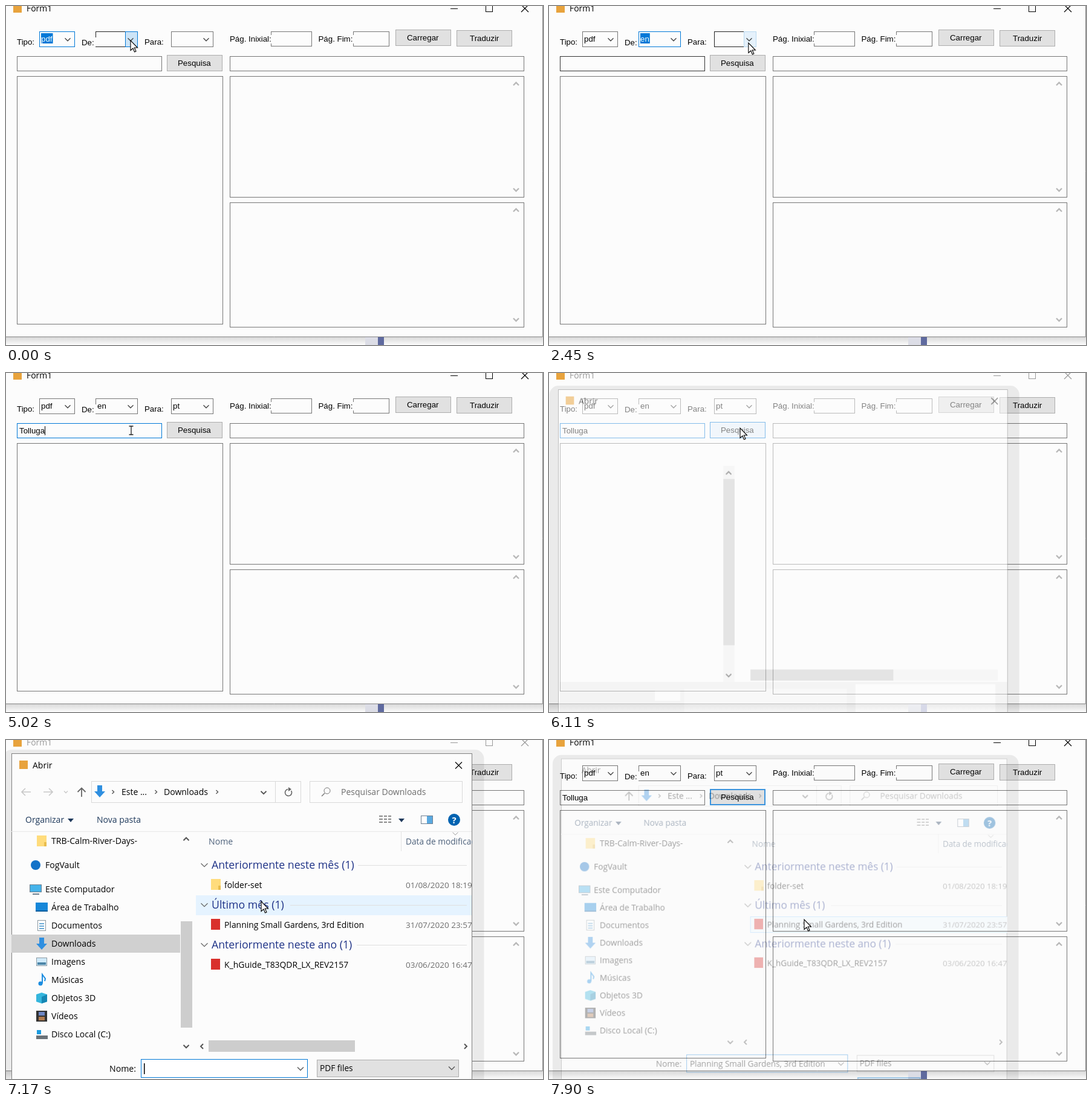
An HTML page with a canvas that plays this animation: 888 by 561 pixels, repeating every 8 s.

```html
<!DOCTYPE html>
<html lang="pt">
<head>
<meta charset="utf-8">
<title>Form1</title>
<style>
html, body { margin: 0; width: 888px; height: 561px; overflow: hidden; background: #fff; }
canvas { display: block; }
</style>
</head>
<body>
<canvas id="stage" width="888" height="561"></canvas>
<script>
const stage = document.getElementById('stage').getContext('2d');
const layer = document.createElement('canvas');
layer.width = 888;
layer.height = 600;
const dialogCtx = layer.getContext('2d');
let g = stage;

const LOOP = 8000, BLUE = '#0078d7', PAPER = '#fcfcfc', INK = '#000';
const FORM = '13.3px "Liberation Sans", Arial, sans-serif';
const ui = size => `${size}px "Open Sans", "Noto Sans", sans-serif`;
const WORD = 'Tolluga', BOOK = 'Planning Small Gardens, 3rd Edition';

// Bursts of screen updates: first, last, count
const bursts = [[0, 0, 1], [130, 740, 5], [1200, 1200, 1], [1630, 1750, 2], [2030, 2960, 8],
  [3080, 3510, 4], [3940, 4870, 8], [5020, 5720, 6], [6110, 7020, 7], [7170, 7620, 4], [7900, 7900, 1]];
const ticks = bursts.flatMap(([a, b, n]) =>
  Array.from({ length: n }, (_, i) => a + (n > 1 ? (b - a) * i / (n - 1) : 0)));

// Pointer path: time, x, y
const path = [[0, 206, 57], [130, 206, 57], [740, 184, 88], [1620, 184, 88], [1750, 187, 90],
  [2030, 187, 90], [2429, 330, 61], [2960, 330, 61], [3500, 313, 77], [3940, 313, 77],
  [4300, 207, 95], [5020, 207, 95], [5440, 316, 91], [6262, 316, 91], [7019, 422, 267],
  [7170, 422, 267], [7320, 422, 297], [LOOP, 422, 297]];

function pointer(t) {
  const i = path.findIndex(p => p[0] > t);
  const [t0, x0, y0] = path[i - 1], [t1, x1, y1] = path[i];
  const k = (t - t0) / (t1 - t0);
  return [x0 + (x1 - x0) * k, y0 + (y1 - y0) * k];
}

function fill(x, y, w, h, color) {
  g.fillStyle = color;
  g.fillRect(x, y, w, h);
}

function box(x, y, w, h, border, color = PAPER, line = 1) {
  fill(x, y, w, h, color);
  g.strokeStyle = border;
  g.lineWidth = line;
  g.strokeRect(x + line / 2, y + line / 2, w - line, h - line);
}

function text(s, x, y, color = INK, font = FORM) {
  g.font = font;
  g.fillStyle = color;
  g.fillText(s, x, y);
}

function lines(color, width, ...strokes) {
  g.strokeStyle = color;
  g.lineWidth = width;
  g.beginPath();
  for (const s of strokes)
    for (let i = 0; i < s.length; i += 2) g[i ? 'lineTo' : 'moveTo'](s[i], s[i + 1]);
  g.stroke();
}

function shape(color, ...p) {
  g.fillStyle = color;
  g.beginPath();
  for (let i = 0; i < p.length; i += 2) g.lineTo(p[i], p[i + 1]);
  g.fill();
}

function disc(x, y, r, color) {
  g.fillStyle = color;
  g.beginPath();
  g.arc(x, y, r, 0, 7);
  g.fill();
}

// dir: 1 down, -1 up
const chevron = (x, y, dir = 1, color = '#444', r = 4.5, w = 1.3) =>
  lines(color, w, [x - r, y - dir * r / 2, x, y + dir * r / 2, x + r, y - dir * r / 2]);
const sideChevron = (x, y, dir = 1, r = 3, color = '#555', w = 1.4) =>
  lines(color, w, [x - dir * r / 2, y - r, x + dir * r / 2, y, x - dir * r / 2, y + r]);
const cross = (x, y, r, color) =>
  lines(color, 1.2, [x - r, y - r, x + r, y + r], [x + r, y - r, x - r, y + r]);
const downArrow = (x, y) =>
  shape('#2f8fe0', x - 4, y - 10, x + 4, y - 10, x + 4, y, x + 9, y, x, y + 10, x - 9, y, x - 4, y);

function combo(x, w, value, { focus, hot, selected } = {}) {
  box(x, 42, w, 26, focus ? BLUE : hot ? '#222' : '#767676');
  if (hot) box(x + w - 21, 42, 21, 26, hot === 'soft' ? '#b9d9f0' : BLUE, hot === 'soft' ? '#e5f1fb' : '#cce4f7');
  chevron(x + w - 12, 55.5);
  g.font = FORM;
  if (selected) fill(x + 3, 45, g.measureText(value).width + 1, 17, BLUE);
  text(value, x + 3, 59, selected ? '#fff' : INK);
}

function dropList(x, pointerY) {
  g.save();
  g.shadowColor = 'rgba(0,0,0,.4)';
  g.shadowBlur = 4;
  g.shadowOffsetX = g.shadowOffsetY = 3;
  fill(x, 67, 70, 68, PAPER);
  g.restore();
  box(x, 67, 70, 68, BLUE);
  const active = Math.floor((pointerY - 69) / 16.3);
  ['pt', 'en', 'ja', 'de'].forEach((s, i) => {
    if (i === active) fill(x + 1, 68.5 + i * 16.3, 68, 16.3, BLUE);
    text(s, x + 3, 82 + i * 16.3, i === active ? '#fff' : INK);
  });
}

function button(s, x, y, tx, border = '#adadad', color = '#e1e1e1', line = 1) {
  box(x, y, 92, 27, border, color, line);
  text(s, tx, y + 18);
}

function drawForm(t, py) {
  const inactive = t >= 5700 && t < 7900;
  const title = inactive ? '#999' : INK;
  fill(0, 0, 888, 561, '#fff');
  const shade = g.createLinearGradient(0, 548, 0, 560);
  shade.addColorStop(0, '#d9d9d9');
  shade.addColorStop(1, '#f8f8f8');
  fill(0, 548, 888, 12, shade);
  fill(594, 548, 21, 13, '#dcdde6');
  fill(615, 548, 10, 13, inactive ? '#b0b4d4' : '#5f6a9f');
  fill(0, 0, 888, 548, PAPER);
  lines('#858585', 1, [0, 547.5, 887.5, 547.5, 887.5, 0]);

  fill(12, -3, 14, 14, '#e8a33d');
  text('Form1', 34, 9, title, ui(13.9));
  lines(title, 1, [735, 4.5, 747, 4.5]);
  g.strokeRect(793.5, -1.5, 11, 11);
  cross(858, 4, 6, title);

  const deOpen = t >= 130 && t < 2030, paraOpen = t >= 2800 && t < 3940;
  const paraHover = t >= 2400 && t < 2800;
  const typing = t >= 4330;
  combo(55, 59, 'pdf', { focus: t < 130, selected: t < 130 });
  const deFocus = t >= 2030 && t < 2800;
  combo(148, 70, t < 2030 ? '' : 'en', { focus: deFocus, selected: deFocus, hot: t < 2030 });
  if (deOpen && (t < 1200 || t >= 1630)) fill(151, 45, 1, 17, INK);
  const paraFocus = t >= 3940 && !typing;
  combo(273, 70, t < 3940 ? '' : 'pt',
    { focus: paraFocus, selected: paraFocus, hot: paraOpen ? true : paraHover && 'soft' });

  box(438, 42, 68, 25, '#767676');
  box(574, 42, 60, 25, '#767676');
  // Labels overlap the left borders
  fill(436, 48, 3, 14, PAPER);
  fill(572, 48, 3, 14, PAPER);
  if (!deFocus) fill(146, 52, 3, 15, PAPER);
  text('Tipo:', 18, 64);
  text('De:', 125, 65);
  text('Para:', 229, 64);
  text('Pág. Inixial:', 370, 59);
  text('Pág. Fim:', 516.5, 59);

  button('Carregar', 644, 39, 663);
  button('Traduzir', 745, 40, 767);
  if (t >= 7900) button('Pesquisa', 266, 81, 284, '#3c95de', '#e1e1e1', 2);
  else if (t >= 5430) button('Pesquisa', 266, 81, 284, BLUE, '#e5f1fb');
  else button('Pesquisa', 266, 81, 284);

  box(18, 83, 240, 25, typing && t < 7900 ? BLUE : deFocus ? '#333' : '#767676');
  if (typing) {
    const typed = WORD.slice(0, Math.max(0, Math.round((t - 4339) / 70)));
    text(typed, 22, 100);
    if (t < 5500) fill(Math.round(22 + g.measureText(typed).width), 88, 1, 15, INK);
  }
  box(370, 83, 487, 25, '#767676');
  box(18, 116, 341, 411, '#767676');
  for (const [y, h] of [[116, 201], [325, 207]]) {
    box(370, y, 487, h, '#767676');
    chevron(843.5, y + 13, -1, '#b8b8b8', 4.5, 2.4);
    chevron(843.5, y + h - 13, 1, '#b8b8b8', 4.5, 2.4);
  }
  if (deOpen) dropList(147, py);
  if (paraOpen) dropList(272, py);
}

const icons = {
  folder(x, y) { fill(x - 8, y - 9, 16, 18, '#ffdc7c'); fill(x + 4, y + 2, 4, 7, '#e9bd4e'); },
  cloud(x, y) { disc(x, y, 8, '#1272c8'); },
  computer(x, y) { box(x - 10, y - 8, 20, 13, '#6b7f8f', '#45b3ea'); fill(x - 5, y + 7, 11, 2, '#6b7f8f'); },
  desktop(x, y) { fill(x - 10, y - 8, 20, 15, '#1687d9'); fill(x - 10, y + 5, 20, 2, '#0d5f9e'); },
  page(x, y) {
    box(x - 7, y - 9, 14, 18, '#8a979f', '#fff');
    lines('#3b8fc9', 1.5, [x - 4, y - 3, x + 4, y - 3], [x - 4, y + 1, x + 4, y + 1], [x - 4, y + 5, x + 4, y + 5]);
  },
  down: downArrow,
  picture(x, y) { box(x - 9, y - 7, 18, 14, '#8c9aa3', '#cfeafa'); fill(x - 7, y + 1, 14, 4, '#4d86a8'); },
  music(x, y) { disc(x - 2, y + 6, 3.5, '#1c8de0'); lines('#1c8de0', 2, [x + 1, y + 6, x + 1, y - 9, x + 6, y - 2, x + 5, y + 2]); },
  cube(x, y) {
    shape('#35b6dd', x, y - 9, x + 9, y - 6, x + 9, y + 6, x, y + 9, x - 9, y + 6, x - 9, y - 6);
    shape('#1687b4', x, y - 2, x + 9, y - 6, x + 9, y + 6, x, y + 9);
  },
  film(x, y) { fill(x - 9, y - 9, 18, 18, '#333'); fill(x - 5, y - 7, 10, 6, '#6d86c4'); fill(x - 5, y + 1, 10, 6, '#b07a4e'); },
  disk(x, y) { fill(x - 8, y - 7, 7, 7, '#1b9be0'); fill(x - 9, y + 2, 19, 6, '#6a7177'); }
};

const sidebar = [['folder', 'TRB-Calm-River-Days-', 167], ['cloud', 'FogVault', 207],
  ['computer', 'Este Computador', 247], ['desktop', 'Área de Trabalho', 277], ['page', 'Documentos', 307],
  ['down', 'Downloads', 337], ['picture', 'Imagens', 367], ['music', 'Músicas', 397],
  ['cube', 'Objetos 3D', 427], ['film', 'Vídeos', 457], ['disk', 'Disco Local (C:)', 487]];

const groups = [['Anteriormente neste mês (1)', 207, 582, 'folder-set', '01/08/2020 18:19'],
  ['Último mês (1)', 273, 470, BOOK, '31/07/2020 23:57'],
  ['Anteriormente neste ano (1)', 339, 580, 'K_hGuide_T83QDR_LX_REV2157', '03/06/2020 16:47']];

function drawToolbar(closing) {
  const body = ui(14), navy = '#1e395b';
  if (!closing) {
    lines('#c8c8c8', 1.6, [41, 86, 26, 86], [32, 80, 26, 86, 32, 92], [62, 86, 77, 86], [71, 80, 77, 86, 71, 92]);
    chevron(99, 86, 1, '#c8c8c8', 3);
  }
  lines('#666', 1.8, [125, 94, 125, 80], [118.5, 86, 125, 79.5, 131.5, 86]);
  box(141, 68, 347, 36, '#d9d9d9');
  lines('#d9d9d9', 1, [445.5, 68, 445.5, 104]);
  downArrow(155, 85);
  for (const x of [177, 248, 349]) sideChevron(x, 86);
  text('Este ...', 191, 91, INK, body);
  text('Downloads', 261, 91, INK, body);
  chevron(426, 87, 1, '#555', 4.5, 1.8);
  g.strokeStyle = '#666';
  g.lineWidth = 1.6;
  g.beginPath();
  g.arc(467, 87, 5.5, -.6, 4.6);
  g.stroke();
  shape('#666', 467, 78, 472, 81.5, 467, 85);
  box(502, 68, 253, 36, '#d9d9d9');
  g.strokeStyle = '#777';
  g.beginPath();
  g.arc(531, 84, 5, 0, 7);
  g.stroke();
  lines('#777', 1.5, [527, 88, 522, 93]);
  text('Pesquisar Downloads', 554, 91, '#6d6d6d', body);

  text('Organizar', 32, 137, navy, body);
  shape(navy, 102, 130, 112, 130, 107, 136);
  text('Nova pasta', 150, 137, navy, body);
  for (const y of [125, 130, 135])
    for (const [x, w] of [[617, 6], [625, 5], [632, 5]]) fill(x, y, w, 2, '#8a8a8a');
  shape(navy, 649, 130, 659, 130, 654, 136);
  box(686, 125, 20, 14, '#6d7f92', '#fff');
  fill(696, 126, 9, 12, '#5aa9e0');
  disc(741, 132, 10, '#0063b1');
  text('?', 737.5, 138, '#fff', 'bold ' + ui(15));
  lines('#e8e8e8', 1, [9, 151.5, 770, 151.5]);
}

function drawDialog(t, py) {
  const loading = t < 6200, closing = t >= 7900, chosen = t >= 7450;
  const body = ui(14.1);
  g = dialogCtx;
  g.clearRect(0, 0, 888, 600);
  g.save();
  g.beginPath();
  g.rect(9, 22, 762, 578);
  g.clip();
  box(9, 22, 762, 600, '#808080');
  if (!closing) {
    fill(22, 34, 14, 14, '#e8a33d');
    cross(748.5, 42, 5.5, INK);
  }
  text('Abrir', 44, 47, INK, ui(14));

  if (!loading) drawToolbar(closing);
  if (!closing) {
    if (loading) {
      fill(289, 152, 19, 366, '#f0f0f0');
      fill(336, 497, 418, 19, '#f0f0f0');
      fill(12, 518, 758, 82, '#ececec');
      fill(173, 533, 43, 17, PAPER);
      fill(223, 530, 275, 70, '#f4f4f4');
      fill(513, 522, 237, 78, PAPER);
    } else fill(9, 322, 279, 30, '#d0d0d0');
    fill(289, loading ? 174 : 300, 19, loading ? 282 : 176, '#cdcdcd');
    fill(335, 497, 242, 19, '#cdcdcd');
  }
  chevron(298, 164, -1, '#555', 4.5, 2);
  chevron(298, 507, 1, '#555', 4.5, 2);
  if (loading) return g.restore();

  sidebar.forEach(([icon, name, y], i) => {
    const parent = i === 1 || i === 2;
    icons[icon](parent ? 49 : 59, y);
    text(name, parent ? 65 : 75, y + 5, INK, body);
  });

  sideChevron(324, 507, -1, 4, '#555', 2);
  sideChevron(760, 507, 1, 4, '#555', 2);
  text('Nome', 335, 173, '#4c607a', body);
  text('Data de modificação', 661, 173, '#4c607a', ui(13.7));
  lines('#e3e3e3', 1, [653.5, 152, 653.5, 184]);
  chevron(743, 155, 1, '#999', 4.5, 1);
  if (py > 257 && py < 290) fill(314, 257, 456, 33, '#e5f3ff');
  if (chosen) box(332, 292, 450, 28, '#99d1ff', closing ? '#eff8ff' : '#cce8ff');
  else if (py >= 290) fill(332, 292, 450, 28, '#e5f3ff');
  groups.forEach(([head, y, x, file, date], i) => {
    chevron(328, y, 1, '#666', 5.5, 1.2);
    text(head, 340, y + 6, '#1e3287', ui(17.7));
    lines('#dfdfdf', 1, [x, y + .5, 762, y + .5]);
    if (i) fill(339, y + 23, 15, 18, '#d9302c');
    else icons.folder(347, y + 32);
    text(file, 361, y + 38, INK, ui(13.9));
    text(date, 661, y + 38, '#6d6d6d', ui(13.5));
  });

  text('Nome:', 171, 549, INK, body);
  box(223, 528, 276, 31, BLUE, '#fff');
  if (chosen) text(BOOK, 229, 549, INK, ui(13.9));
  else fill(228, 535, 1.5, 18, INK);
  chevron(487, 544, 1, '#555', 5);
  box(514, 529, 235, 29, '#adadad', closing ? PAPER : '#e1e1e1');
  text('PDF files', 519, 548, INK, ui(13.7));
  chevron(737, 543, 1, '#555', 5);
  box(515, 567, 108, 32, BLUE, '#e1e1e1', 2);
  g.restore();
}

function showDialog(t, py) {
  drawDialog(t, py);
  g = stage;
  const closing = t >= 7900;
  const [scale, dx, dy, alpha] = t < 6200 ? [.976, 6.2, 5.5, .52]
    : closing ? [.968, 11.3, 9.3, .37] : [1, 0, 0, 1];
  g.save();
  g.setTransform(scale, 0, 0, scale, dx, dy);
  g.beginPath();
  g.roundRect(-5.5, 16, 796, 640, 15);
  g.rect(9, 22, 762, 600);
  g.fillStyle = 'rgba(0,0,0,.07)';
  g.fill('evenodd');
  // While closing, the form is already repainted and stays fully dark
  if (closing) g.globalCompositeOperation = 'multiply';
  g.globalAlpha = alpha;
  g.drawImage(layer, 0, 0);
  g.restore();
}

function drawPointer(x, y, beam) {
  if (beam) {
    lines('#222', 1.3, [x - 3.5, y - 7, x + 3.5, y - 7], [x, y - 7, x, y + 7], [x - 3.5, y + 7, x + 3.5, y + 7]);
    return;
  }
  g.save();
  g.translate(x, y);
  shape('#fff', 0, 0, 0, 16.5, 4, 13, 6.5, 19, 9, 18, 6.3, 12, 11.5, 12);
  g.closePath();
  g.strokeStyle = '#000';
  g.lineWidth = 1.1;
  g.stroke();
  g.restore();
}

function draw(now) {
  const t = ticks.findLast(k => k <= now);
  const [x, y] = pointer(t);
  g = stage;
  drawForm(t, y);
  if (t >= 6110) showDialog(t, y);
  drawPointer(x, y, t > 4100 && t < 5400 && x < 258 && y > 83);
}

const start = performance.now();
(function loop() {
  draw((performance.now() - start) % LOOP);
  requestAnimationFrame(loop);
})();
</script>
</body>
</html>
```
